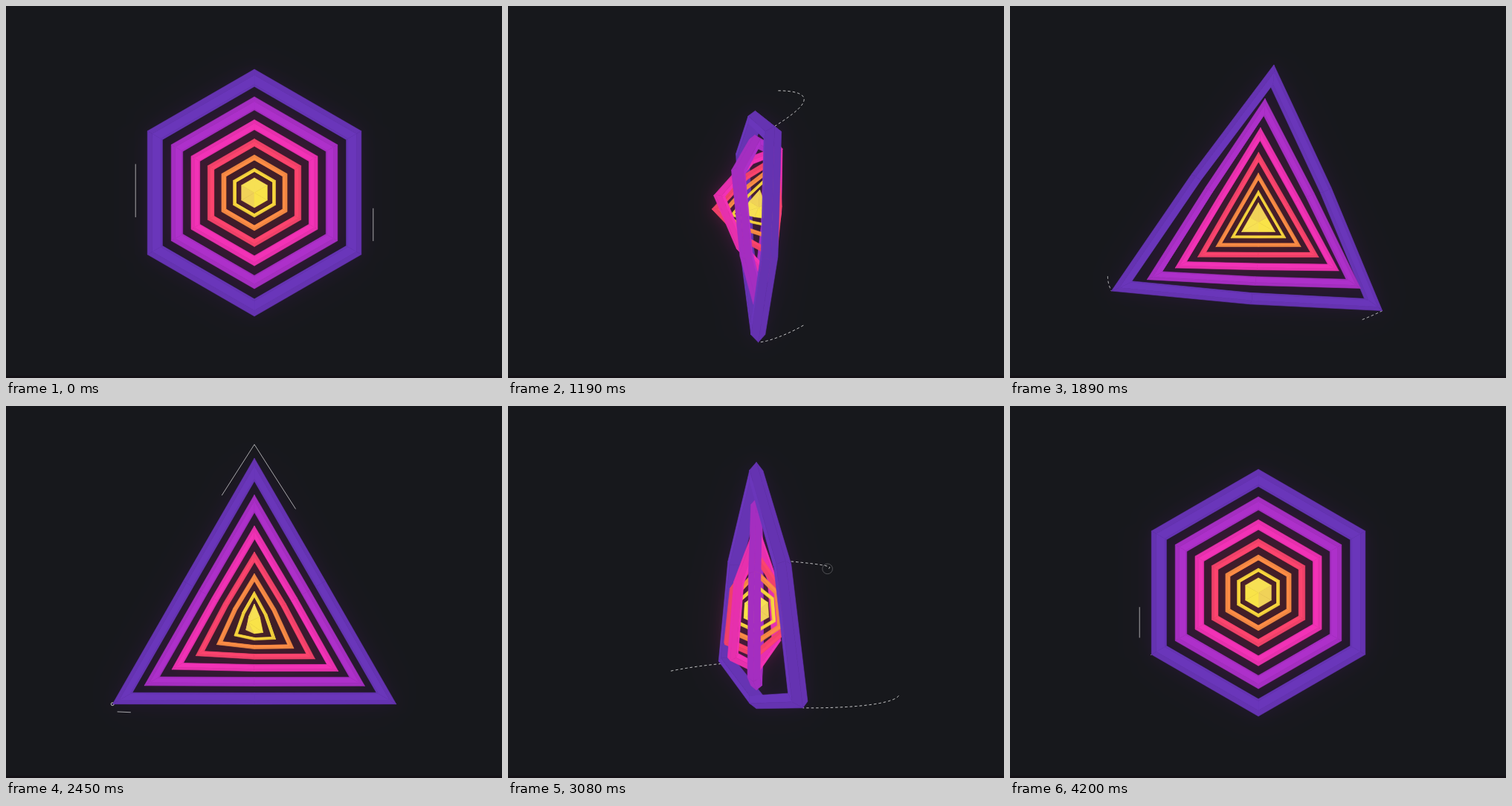
Recreate the animation shown at these times as an HTML page with a canvas. Size 667x500 px, loop 4.27 s.

```html
<!DOCTYPE html>
<html lang="en">
<head>
<meta charset="utf-8">
<title>Nested rings</title>
<style>
  html, body { margin: 0; width: 100%; height: 100%; overflow: hidden; background: #17181c; }
  canvas { display: block; width: 667px; height: 500px; }
</style>
</head>
<body>
<canvas id="stage" width="667" height="500"></canvas>
<script>
const LOOP = 4270, W = 667, H = 500, CX = 334, CY = 251, DROP = 39.5;
const CAMERA = 1000, TILT = .08, RINGS = 6, OUTER = 166, CORE = 20;
const LEAD = 93, LEAD_IN = 150, OPEN = 700, CLOSE = 2635, TURN_MS = 1650;
const COLORS = ['#6a36ba', '#ad30ca', '#f232b6', '#fc446e', '#fd8d46', '#fcd93e'].map(rgb);
const CORE_COLORS = ['#f7e054', '#f9e348', '#f0d258'].map(rgb);

// Wakes behind outer vertices, each with a ripple at its origin
const WAKES = [
  { vertex: 0, lag: 355, ripple: -140 },
  { vertex: 2, lag: 180, ripple: -140 },
  { vertex: 2, lag: 360, back: true },
  { vertex: 4, lag: 140, ripple: -200, back: true },
  { vertex: 1, lag: 450, ripple: 285, back: true }
];

// Light strokes that run round the outline, in vertex steps
const RUNNERS = [
  { from: 4, to: 5.9, start: -250, head: 600, tail: 930 },
  { from: 1.5, to: 3, start: -65, head: 205, tail: 373 },
  { from: 5, to: 7.9, start: 2280, head: 335, tail: 565, back: true },
  { from: 2, to: 3.9, start: 2250, head: 210, tail: 235, back: true }
];

const ctx = document.getElementById('stage').getContext('2d');
const solid = makeLayer(), glow = makeLayer();

function makeLayer() {
  const c = document.createElement('canvas');
  c.width = W;
  c.height = H;
  return c.getContext('2d');
}

function rgb(hex) {
  return [1, 3, 5].map(i => parseInt(hex.slice(i, i + 2), 16));
}

const clamp = x => Math.min(1, Math.max(0, x));
const sine = x => (1 - Math.cos(Math.PI * clamp(x))) / 2;
const rad = d => d * Math.PI / 180;
const ringSize = i => 224 * .835 ** i - 58;
const stretch = (k, m) => 1 + (k % 2 ? -.335 : .327) * m;

// Quick start, long settle
function turn(ms) {
  const x = clamp((ms + LEAD_IN) / TURN_MS), a = x ** 2.1;
  return a / (a + .326 * (1 - x) ** 1.38);
}

// Drop of the whole group and the slight shrink while it opens
function groupAt(t) {
  return {
    cy: CY + DROP * (sine((t - 500) / 1380) - sine((t - 2500) / 1300)),
    scale: 1 - .075 * Math.sin(Math.PI * clamp((t - 500) / 1700)) ** 2
  };
}

function ringAt(t, i) {
  const back = t >= CLOSE - LEAD_IN - i * LEAD;
  const ms = t - (back ? CLOSE : OPEN) + i * LEAD;
  return { back, ms, p: turn(ms) };
}

// Screen point of vertex k; odd vertices become edge midpoints of the triangle
function place(radius, k, z, { p, back }, group) {
  const r = radius * stretch(k, back ? 1 - p : p) * group.scale;
  const a = rad(-90 + 60 * k + (back ? 0 : 120 * p)), b = rad(180 * p);
  const x0 = r * Math.cos(a);
  const x = x0 * Math.cos(b) - z * Math.sin(b);
  const depth = x0 * Math.sin(b) + z * Math.cos(b);
  const f = CAMERA / (CAMERA - depth);
  const y = r * Math.sin(a) * f + TILT * x0 * Math.sin(b);
  return [CX + x * f, group.cy + y, depth];
}

function addFace(list, pts, color, shade, heat) {
  let area = 0;
  pts.forEach((a, i) => {
    const b = pts[(i + 1) % pts.length];
    area += a[0] * b[1] - b[0] * a[1];
  });
  if (area <= 0) return;
  const [r, g, b] = color;
  list.push({
    pts,
    depth: pts.reduce((s, q) => s + q[2], 0) / pts.length,
    fill: `rgb(${color.map(c => Math.round(c * shade))})`,
    light: `rgb(${[r, g * .25, b * .9].map(c => Math.round(c * heat))})`
  });
}

// A ring has a bevelled outer rim and a flat inner wall
function addRing(list, i, pose, group) {
  const R = ringSize(i), h = R * .057, heat = .35 + .13 * i;
  const corner = (k, s, z) => place(R * s, k % 6, z, pose, group);
  for (let k = 0; k < 6; k++) {
    const edge = (s, z) => [corner(k, s, z), corner(k + 1, s, z)];
    const [m0, m1] = edge(1, 0);
    const [f0, f1] = edge(.945, h), [b0, b1] = edge(.945, -h);
    const [u0, u1] = edge(.868, h), [v0, v1] = edge(.868, -h);
    const add = (pts, shade) => addFace(list, pts, COLORS[i], shade, heat);
    add([f0, f1, u1, u0], 1);
    add([v0, v1, b1, b0], 1);
    add([m0, m1, f1, f0], .95);
    add([b0, b1, m1, m0], .95);
    add([u0, u1, v1, v0], .96);
  }
}

function addCore(list, pose, group) {
  const tip = z => place(0, 0, z * CORE * .5, pose, group);
  const front = tip(1), rear = tip(-1);
  for (let k = 0; k < 6; k++) {
    const a = place(CORE, k, 0, pose, group), b = place(CORE, (k + 1) % 6, 0, pose, group);
    const color = CORE_COLORS[Math.floor(((k + 1) % 6) / 2)];
    addFace(list, [front, a, b], color, 1, 1);
    addFace(list, [rear, b, a], color, 1, 1);
  }
}

function trace(g, pts) {
  g.beginPath();
  for (const [x, y] of pts) g.lineTo(x, y);
}

function paint(g, faces, key) {
  g.clearRect(0, 0, W, H);
  g.lineWidth = .6;
  g.lineJoin = 'round';
  for (const face of faces) {
    trace(g, face.pts);
    g.closePath();
    g.fillStyle = g.strokeStyle = face[key];
    g.fill();
    g.stroke();
  }
}

function drawGlow() {
  ctx.save();
  ctx.globalCompositeOperation = 'lighter';
  for (const [blur, alpha] of [[10, .28], [30, .17]]) {
    ctx.filter = `blur(${blur}px)`;
    ctx.globalAlpha = alpha;
    ctx.drawImage(glow.canvas, 0, 0);
  }
  ctx.restore();
}

function drawWakes(t, group) {
  const { back, ms } = ringAt(t, 0);
  for (const w of WAKES.filter(w => !!w.back === back)) {
    const lag = w.lag + (160 - w.lag) * clamp((ms - 490) / 700);
    const from = turn(ms - lag), to = turn(ms);
    if (to - from < .002) continue;
    const pts = Array.from({ length: 41 }, (_, i) =>
      place(OUTER, w.vertex, 0, { p: from + (to - from) * i / 40, back }, group));
    ctx.setLineDash([3.5, 3]);
    ctx.strokeStyle = 'rgba(255,255,255,.75)';
    trace(ctx, pts);
    ctx.stroke();
  }
  ctx.setLineDash([]);
}

function drawRipples(t, group) {
  for (const { vertex, ripple, back = false } of WAKES) {
    const u = (t - (back ? CLOSE : OPEN) - ripple) / 230;
    if (!(u >= 0 && u <= 1)) continue;
    const [x, y] = place(OUTER, vertex, 0, { p: 0, back }, group);
    ctx.beginPath();
    ctx.arc(x, y, 1.3 + 6.2 * Math.sin(u * Math.PI / 2), 0, 7);
    ctx.strokeStyle = `rgba(255,255,255,${.7 * (1 - u) ** 1.2 + .08})`;
    ctx.stroke();
  }
}

// Point on the outline just outside the resting shape
function outline(v, back, group) {
  const vertex = k => {
    const grow = 18.5 / stretch(k, back ? 1 : 0);
    return place(OUTER + grow, k % 6, 0, { p: 0, back }, group);
  };
  const k = Math.floor(v), a = vertex(k), b = vertex(k + 1);
  return [0, 1].map(i => a[i] + (b[i] - a[i]) * (v - k));
}

function drawRunners(t, group) {
  ctx.strokeStyle = 'rgba(255,255,255,.62)';
  for (const { from, to, start, head, tail, back = false } of RUNNERS) {
    const ms = (!back && t > LOOP / 2 ? t - LOOP : t) - start;
    const at = time => from + (to - from) * sine(ms / time);
    const a = at(tail), b = at(head);
    if (b - a < .001) continue;
    const stops = [a];
    for (let v = Math.floor(a) + 1; v < b; v++) stops.push(v);
    stops.push(b);
    trace(ctx, stops.map(v => outline(v, back, group)));
    ctx.stroke();
  }
}

function draw(t) {
  const group = groupAt(t), faces = [];
  for (let i = 0; i < RINGS; i++) addRing(faces, i, ringAt(t, i), group);
  addCore(faces, ringAt(t, RINGS), group);
  faces.sort((a, b) => a.depth - b.depth);
  paint(solid, faces, 'fill');
  paint(glow, faces, 'light');

  ctx.fillStyle = '#17181c';
  ctx.fillRect(0, 0, W, H);
  ctx.fillStyle = '#141116';
  ctx.fillRect(0, 497, W, 3);
  ctx.lineWidth = 1;
  drawGlow();
  drawRunners(t, group);
  drawWakes(t, group);
  drawRipples(t, group);
  ctx.drawImage(solid.canvas, 0, 0);
}

const begin = performance.now();
function tick() {
  draw((performance.now() - begin) % LOOP);
  requestAnimationFrame(tick);
}
tick();
</script>
</body>
</html>
```
